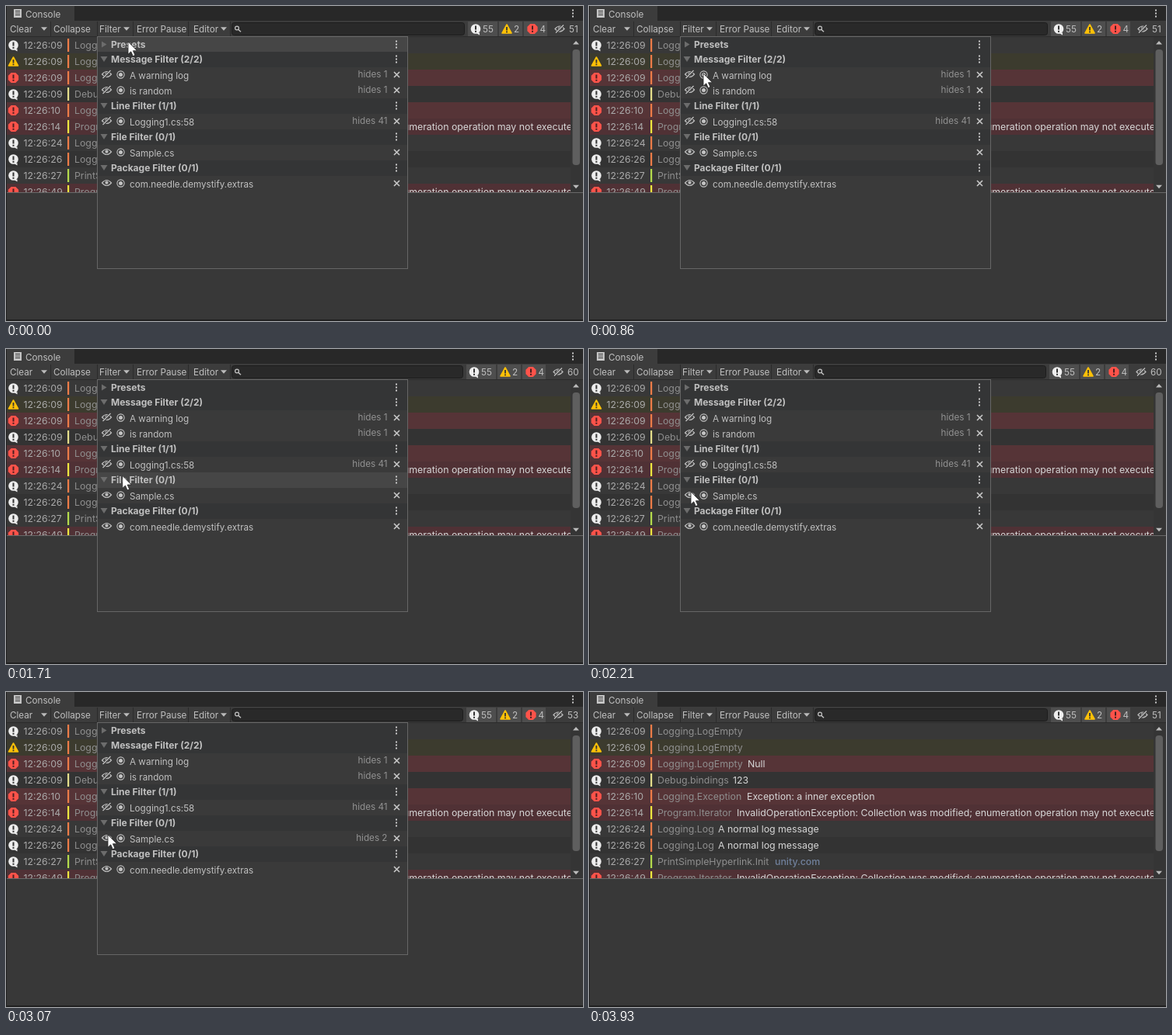
These frames come from a looping animation (742 by 406 pixels, 4000 ms). An HTML page:

```html
<!DOCTYPE html>
<html lang="en">
<head>
<meta charset="utf-8">
<title>Console filter</title>
<style>
html, body { margin: 0; width: 100%; height: 100%; overflow: hidden; background: #383838; }
svg { display: block; }
text { font: 11.7px Inter, "Open Sans", sans-serif; fill: #c0c0c0; white-space: pre; }
.log text { font-size: 12.33px; }
.log .time { fill: #aaa; }
.log .origin { fill: #8e8e8e; }
.log .message { fill: #d6d6d6; }
.log .link { fill: #70809c; font-weight: 500; }
text.head { font-weight: 700; font-size: 12px; }
text.hides { fill: #929292; text-anchor: end; }
.dim { opacity: .3; }
.soft { opacity: .55; }
</style>
</head>
<body>
<svg width="742" height="406" viewBox="0 0 742 406">
  <g id="view"></g>
  <path id="cursor" d="M0 0V16.2L3.7 12.8L6.3 18.6L9 17.4L6.4 11.7H11.6Z" fill="#fff" stroke="#222" stroke-width=".8"/>
</svg>
<script>
const LOOP = 4000, STEP = 500 / 7;
const ORANGE = '#ee7c48', YELLOW = '#eee83f', PALE = '#e6df8b', LIME = '#b5dc4c';

const iterator = time => ({
  kind: 'error', time, bar: YELLOW, origin: 'Program.Iterator', x: 190, file: 'Sample.cs',
  message: 'InvalidOperationException: Collection was modified; enumeration operation may not execute.'
});
const normal = time => ({
  kind: 'info', time, bar: ORANGE, origin: 'Logging.Log', x: 166, message: 'A normal log message'
});
const empty = (kind, time, message) => ({ kind, time, bar: ORANGE, origin: 'Logging.LogEmpty', x: 204, message });

const logs = [
  empty('info', '12:26:09'),
  empty('warn', '12:26:09'),
  empty('error', '12:26:09', 'Null'),
  { kind: 'info', time: '12:26:09', bar: PALE, origin: 'Debug.bindings', x: 185, message: '123' },
  { kind: 'error', time: '12:26:10', bar: ORANGE, origin: 'Logging.Exception', x: 203, message: 'Exception: a inner exception' },
  iterator('12:26:14'),
  normal('12:26:24'),
  normal('12:26:26'),
  { kind: 'info', time: '12:26:27', bar: LIME, origin: 'PrintSimpleHyperlink.Init', x: 239, message: 'unity.com', link: true },
  iterator('12:26:49')
];
const lists = {
  full: logs,
  solo: [empty('warn', '12:26:12')],
  filtered: logs.filter(l => l.file !== 'Sample.cs')
};

// Each state holds from its start time until the next one.
const states = [
  { at: 0, list: 'full', hidden: 51 },
  { at: 1070, list: 'solo', hidden: 51 },
  { at: 1570, list: 'full', hidden: 60 },
  { at: 2430, list: 'filtered', hidden: 51 },
  { at: 2930, list: 'full', hidden: 53, sampleHides: true },
  { at: 3290, list: 'full', hidden: 51 },
  { at: 3860, list: 'full', hidden: 51, closed: true }
];

const path = [
  [0, 157, 46], [120, 157, 46], [560, 147, 87], [1500, 147, 87], [1710, 150, 163],
  [2000, 131, 184], [3140, 131, 184], [3430, 112, 338], [3640, 92, 408], [4000, 92, 430]
];

const rect = (x, y, w, h, fill, more = '') =>
  `<rect x="${x}" y="${y}" width="${w}" height="${h}" fill="${fill}" ${more}/>`;
const text = (x, y, s, cls = '') => `<text x="${x}" y="${y}" class="${cls}">${s}</text>`;
const shape = (d, fill) => `<path d="${d}" fill="${fill}"/>`;
const line = (d, color, w = 1) => `<path d="${d}" fill="none" stroke="${color}" stroke-width="${w}"/>`;
const group = (s, cls) => `<g class="${cls}">${s}</g>`;
const arrow = (x, y, color = '#bbb', r = 4, h = 4.5) =>
  shape(`M${x - r} ${y - h / 2}h${2 * r}l${-r} ${h}Z`, color);
const dots = (x, y, color = '#c8c8c8') =>
  [-4, 0, 4].map(d => rect(x - 1, y + d - 1, 2, 2, color)).join('');

function icon(kind, x, y) {
  if (kind === 'warn')
    return `<path d="M${x} ${y - 5.5}l6 11h-12Z" fill="#ffc107" stroke="#ffc107" stroke-width="1.6" stroke-linejoin="round"/>` +
      rect(x - .9, y - 2.5, 1.8, 4.5, '#333') + rect(x - .9, y + 3, 1.8, 1.8, '#333');
  const error = kind === 'error', mark = error ? '#4a2020' : '#333';
  const body = error
    ? shape(`M${x - 2.8} ${y - 6.5}h5.6l3.8 3.8v5.4l-3.8 3.8h-5.6l-3.8 -3.8v-5.4Z`, '#ff534a')
    : `<circle cx="${x}" cy="${y}" r="6.3" fill="#eee"/>` + shape(`M${x} ${y + 5}h5v3Z`, '#eee');
  return body + rect(x - 1, y - 4, 2, 5, mark) + rect(x - 1, y + 2.3, 2, 2, mark);
}

function eye(x, y, off) {
  const open = line(`M${x - 6} ${y}q6 -7 12 0q-6 7 -12 0Z`, '#bbb', 1.2) +
    `<circle cx="${x}" cy="${y - .3}" r="2.1" fill="#bbb"/>`;
  return open + (off ? line(`M${x - 4.5} ${y + 5}L${x + 5} ${y - 5}`, '#3a3a3a', 3) +
    line(`M${x - 5} ${y + 5}L${x + 5} ${y - 5}`, '#c4c4c4', 1.2) : '');
}

function toolbar(hidden) {
  const dx = hidden === 51 ? 0 : -2;
  const button = (x, w) => rect(x + dx, 20, w, 19, '#4e4e4e');
  return rect(0, 0, 742, 19, '#282828') + rect(1, 0, 87, 20, '#3c3c3c') + rect(1, 19, 741, 21, '#3c3c3c') +
    rect(10, 4, 10, 11, '#c4c4c4') + [6, 8.5, 11].map(y => rect(12, y, 6, 1, '#3c3c3c')).join('') +
    text(25, 14.5, 'Console') + dots(729, 9.5) +
    [57, 117, 163, 234, 288].map(x => rect(x, 20, 1, 19, '#2b2b2b')).join('') +
    text(5, 34, 'Clear') + arrow(49, 29.5) + text(61, 34, 'Collapse') +
    text(120, 34, 'Filter') + arrow(155, 29.5) + text(168, 34, 'Error Pause') +
    text(241, 34, 'Editor') + arrow(280, 29.5) +
    rect(290.5, 21.5, 299 + dx, 16, '#292929', 'rx="3" stroke="#1d1d1d"') +
    '<circle cx="297" cy="28.5" r="2.4" fill="none" stroke="#c4c4c4" stroke-width="1.2"/>' +
    line('M298.7 30.2L302 33.3', '#c4c4c4', 1.4) +
    button(594, 38) + button(634, 30) + button(666, 30) +
    icon('info', 604 + dx, 29.5) + text(613 + dx, 34, '55') +
    icon('warn', 644 + dx, 29.5) + text(653 + dx, 34, '2') +
    icon('error', 677 + dx, 29.5) + text(686.5 + dx, 34, '4') +
    eye(712 + dx, 29.5, true) + text(724 + dx, 34, hidden) +
    rect(0, 39, 742, 1, '#2b2b2b');
}

function logRow(log, i, width) {
  const y = 40 + 21 * i, mid = y + 10.5;
  const fill = { info: i % 2 ? '#333' : '#383838', warn: '#3c3b2e', error: i % 2 ? '#503135' : '#563437' }[log.kind];
  return rect(1, y, width, 21, fill) + icon(log.kind, 9.5, mid) + text(22.5, mid + 4.5, log.time, 'time') +
    rect(79, y + 2, 2.2, 17, log.bar) + text(88, mid + 4.5, log.origin, 'origin') +
    (log.message ? text(log.x, mid + 4.5, log.message, log.link ? 'link' : 'message') : '');
}

function logList(name) {
  const full = name === 'full';
  const bar = rect(726, 40, 15, 200, '#353535') + rect(728.5, 56, 9.5, 149, '#5f5f5f', 'rx="4"') +
    shape('M729 49.5h8l-4 -4.5Z', '#bbb') + arrow(733, 233);
  const rows = lists[name].map((l, i) => logRow(l, i, full ? 725 : 737)).join('');
  return `<svg class="log" width="742" height="240">${rows}${full ? bar : ''}</svg>` +
    rect(0, 240, 742, 1, '#696969');
}

function popup(state, hover) {
  const solo = state.list === 'solo', on = state.list === 'filtered';
  const head = (y, title, folded) => {
    const faded = solo && y > 79;
    const color = solo && !faded ? '#8c8c8c' : '#6c6c6c';
    const fold = folded ? shape(`M123 ${y + 5.5}v8l6.5 -4Z`, color) : arrow(126, y + 9.5, color, 4.5, 7);
    return rect(118, y, 398, 20, y === hover ? '#464646' : '#343536') +
      group(fold + text(135, y + 14, title, 'head'), faded && 'dim') +
      group(dots(502, y + 9.5), faded && 'soft');
  };
  const item = (y, title, off, hides) => {
    const picked = solo && y === 79, faded = solo && !picked;
    const mid = y + 10, tint = picked ? '#b84a60' : '#c4c4c4';
    const target = `<circle cx="147.5" cy="${mid - .5}" r="4.6" fill="none" stroke="${tint}" stroke-width="1.1"/>` +
      `<circle cx="147.5" cy="${mid - .5}" r="2.5" fill="${tint}"/>`;
    const cross = line(`M499 ${mid - 4}l7 7m0 -7l-7 7`, picked ? '#eee' : '#c8c8c8', 1.6);
    return group(eye(129.5, mid - 1, off), solo && (y < 119 ? 'dim' : 'soft')) +
      group(target + cross, faded && 'soft') +
      group(text(159, mid + 4.7, title), faded && 'dim') +
      (hides && !solo ? text(490.5, mid + 3, 'hides ' + hides, 'hides') : '');
  };
  return rect(117.5, 39.5, 399, 299, '#3a3a3a', 'stroke="#666"') +
    head(40, 'Presets', true) +
    head(59, 'Message Filter (2/2)') + item(79, 'A warning log', true, 1) + item(99, 'is random', true, 1) +
    head(119, 'Line Filter (1/1)') + item(139, 'Logging1.cs:58', true, 41) +
    head(159, `File Filter (${on ? 1 : 0}/1)`) + item(179, 'Sample.cs', on, state.sampleHides && 2) +
    head(199, 'Package Filter (0/1)') + item(219, 'com.needle.demystify.extras', false);
}

function cursorAt(t) {
  const i = path.findIndex((p, n) => n && t <= p[0]);
  const [t0, x0, y0] = path[i - 1], [t1, x1, y1] = path[i];
  const k = (t - t0) / (t1 - t0);
  return [x0 + (x1 - x0) * k, y0 + (y1 - y0) * k];
}

const view = document.getElementById('view'), cursor = document.getElementById('cursor');
let shown = '';

function render(now) {
  const t = Math.floor((now % LOOP + 5) / STEP) * STEP % LOOP;
  const state = states.findLast(s => s.at <= t + 5);
  const [x, y] = cursorAt(t);
  const hover = [40, 59, 119, 159, 199].find(top => y >= top && y < top + (top === 40 ? 19 : 20));
  const key = state.at + '/' + hover;
  if (key !== shown) {
    shown = key;
    view.innerHTML = rect(0, 0, 742, 406, '#383838') + toolbar(state.hidden) + logList(state.list) +
      (state.closed ? '' : popup(state, hover)) +
      rect(0, 0, 1, 406, '#202020') + rect(0, 404, 742, 2, '#202020');
  }
  cursor.setAttribute('transform', `translate(${x} ${y})`);
}

const start = performance.now();
function tick() {
  render(performance.now() - start);
  requestAnimationFrame(tick);
}
tick();
</script>
</body>
</html>
```
